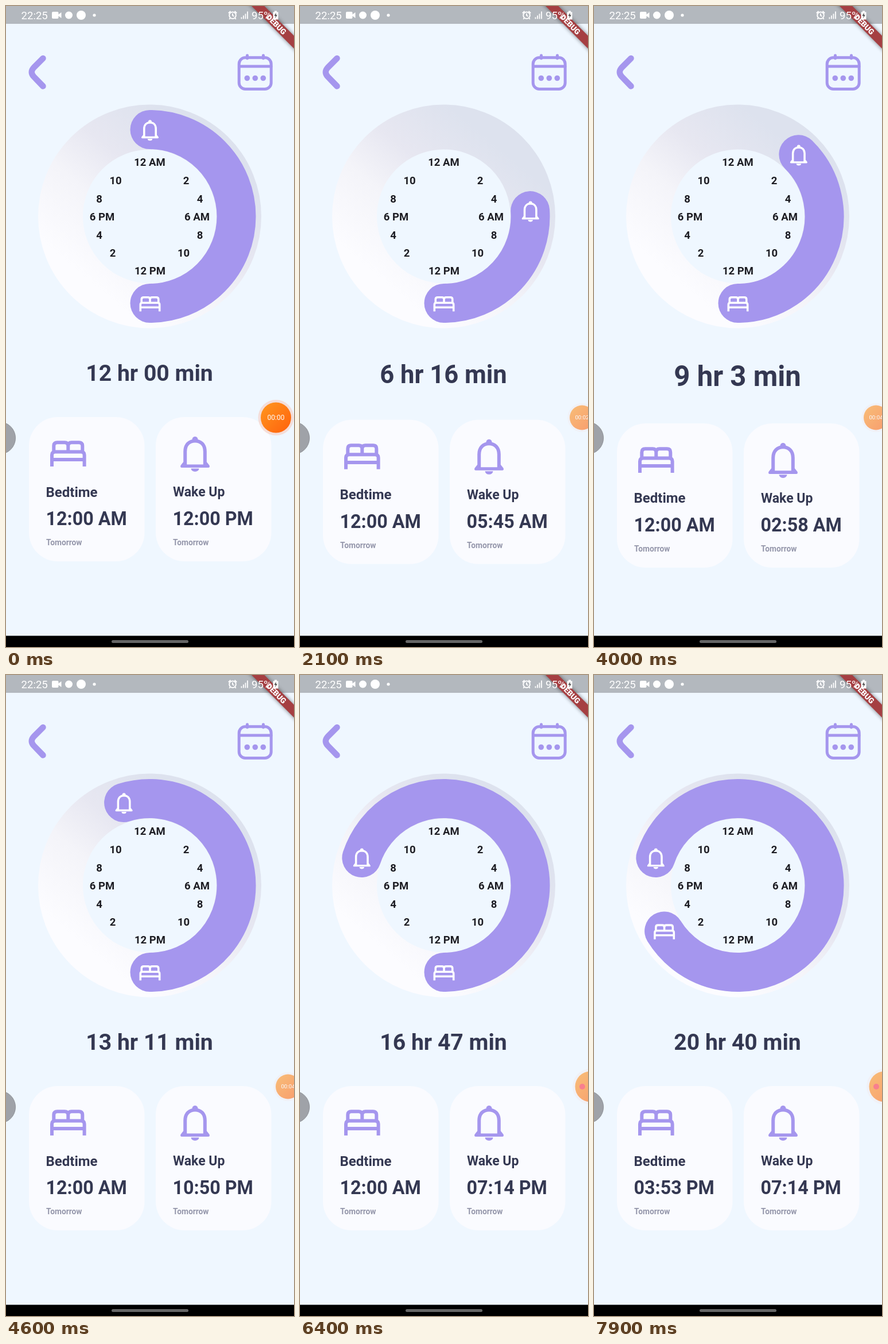
Recreate the animation shown at these times as an HTML page. Size 502 by 1115 pixels, loop 8000 ms.

```html
<!DOCTYPE html>
<html lang="en">
<head>
<meta charset="utf-8">
<title>Sleep timer</title>
<style>
  html, body { margin: 0; width: 100%; height: 100%; overflow: hidden; background: #eff7ff; }
  svg { display: block; width: 502px; height: 1115px; font-family: Roboto, sans-serif; }
  .dial { font-size: 18.5px; font-weight: 700; fill: #1c1c22; text-anchor: middle; }
  .ink { font-weight: 700; fill: #343852; }
  .title { font-size: 24px; }
  .time { font-size: 32.3px; }
  .day { font-size: 13.8px; font-weight: 700; fill: #9597ab; }
  .status { font-size: 18.6px; fill: #fff; }
</style>
</head>
<body>
<svg viewBox="0 0 502 1115">
  <defs>
    <linearGradient id="track" x1=".82" y1=".12" x2=".18" y2=".88">
      <stop offset="0" stop-color="#dde2ee"/>
      <stop offset=".35" stop-color="#e7e7f1"/>
      <stop offset=".62" stop-color="#f4f4f9"/>
      <stop offset="1" stop-color="#fcfcff"/>
    </linearGradient>
    <linearGradient id="orange" x1="0" y1="0" x2="1" y2="1">
      <stop offset="0" stop-color="#ff981f"/>
      <stop offset="1" stop-color="#ff600d"/>
    </linearGradient>
    <filter id="blur" x="-20%" y="-100%" width="140%" height="300%"><feGaussianBlur stdDeviation="3.5"/></filter>
    <g id="bell">
      <circle cy="-25" r="5" fill="currentColor"/>
      <path d="M-17.3 20V-4C-17.3 -16 -10 -22.6 0 -22.6S17.3 -16 17.3 -4V20" fill="none" stroke="currentColor" stroke-width="6"/>
      <path d="M-20.2 14L-25 20Q-26.5 24 -23 24H23Q26.5 24 25 20L20.2 14L14.4 18.4H-14.4Z" fill="currentColor"/>
      <path d="M-7 25.4A7 5.6 0 0 0 7 25.4Z" fill="currentColor"/>
    </g>
    <g id="bed" fill="none" stroke="currentColor" stroke-width="6">
      <path d="M-25 -2V-13Q-25 -19.2 -19 -19.2H-6Q0 -19.2 0 -13V-4V-13Q0 -19.2 6 -19.2H19Q25 -19.2 25 -13V-2"/>
      <path d="M-28.3 22.5V2.5Q-28.3 -3 -22.5 -3H22.5Q28.3 -3 28.3 2.5V22.5M-28 10.6H28"/>
    </g>
  </defs>

  <rect width="502" height="1115" fill="#eff7ff"/>

  <g fill="none" stroke="#a596ee" stroke-linecap="round" stroke-linejoin="round">
    <path d="M64.5 91L48.5 107Q41 115 48.5 123L64.5 139.5" stroke-width="10.5"/>
    <rect x="406.2" y="89.7" width="56" height="54.8" rx="11" stroke-width="5"/>
    <path d="M407 105H462M420.5 86V91M448.5 86V91" stroke-width="5"/>
  </g>
  <g fill="#a596ee">
    <circle cx="420.3" cy="125.5" r="4.8"/><circle cx="434.3" cy="125.5" r="4.8"/><circle cx="448.3" cy="125.5" r="4.8"/>
  </g>

  <circle cx="250.5" cy="366" r="155.5" fill="none" stroke="url(#track)" stroke-width="78"/>
  <path id="arc" fill="none" stroke="#a596ee" stroke-width="68" stroke-linecap="round"/>
  <use id="bellKnob" href="#bell" color="#fff"/>
  <use id="bedKnob" href="#bed" color="#fff"/>
  <g id="dial" class="dial"></g>

  <text id="total" class="ink" x="250" text-anchor="middle"></text>

  <g id="cards">
    <rect x="40" y="715" width="201.5" height="251" rx="50" fill="#fafbff"/>
    <rect x="261" y="715" width="201.5" height="251" rx="50" fill="#fafbff"/>
    <use href="#bed" x="108.3" y="778.5" color="#a596ee"/>
    <use href="#bell" x="329.5" y="779" color="#a596ee"/>
    <text class="ink title" x="69.5" y="853.5">Bedtime</text>
    <text class="ink title" x="291" y="853" style="font-size:23px">Wake Up</text>
    <text id="bedTime" class="ink time" x="69.5" y="903.4"></text>
    <text id="wakeTime" class="ink time" x="290.5" y="903"></text>
    <text class="day" x="70" y="938">Tomorrow</text>
    <text class="day" x="291" y="938">Tomorrow</text>
  </g>

  <circle cx="-11.5" cy="751.5" r="28" fill="#9fa2a8" stroke="#8f9298"/>

  <g id="badge">
    <circle id="halo" r="31" fill="#f6d8d0"/>
    <circle r="26.5" fill="url(#orange)"/>
    <text id="clock" text-anchor="middle" y="4.3" font-size="12" fill="#fff"></text>
    <circle id="dot" cx="-14" r="5" fill="#ff3044"/>
  </g>

  <rect width="502" height="31" fill="#b3b8be"/>
  <g transform="translate(502 0) rotate(45)">
    <rect x="-80" y="36.6" width="160" height="15.7" filter="url(#blur)" opacity=".5"/>
    <rect x="-80" y="36.6" width="160" height="15.7" fill="#a53f42"/>
    <text x="1" y="49.2" text-anchor="middle" font-size="13.4" font-weight="900" fill="#fff">DEBUG</text>
  </g>
  <g fill="#fff">
    <text class="status" x="26.5" y="22.6">22:25</text>
    <rect x="80" y="10" width="11.5" height="12" rx="2"/><path d="M91 15L96.5 11V21L91 17Z"/>
    <circle cx="109.5" cy="16" r="6.5"/><circle cx="131" cy="16" r="8"/><circle cx="154" cy="16" r="2.6"/>
    <path d="M409.5 22.5v-3h2v3zM413 22.5v-6h2v6zM416.5 22.5v-9h2v9zM420 22.5v-13h2v13z" opacity=".9"/>
    <text class="status" x="428" y="22.6">95%</text>
    <path d="M465.5 10.5h2.5v-2h4v2h2.5v13h-9z"/>
  </g>
  <path d="M471 11.5L467.5 17H470L469 21.5L472.8 15.5H470.3Z" fill="#444"/>
  <g fill="none" stroke="#fff" stroke-width="1.9">
    <circle cx="395" cy="16.3" r="5.8"/>
    <path d="M395 13V16.5L397.5 18M387.8 12.5L391.5 9M402.2 12.5L398.5 9M390.7 21L389.3 23M399.3 21L400.7 23"/>
  </g>

  <rect y="1095.5" width="502" height="19.5"/>
  <rect x="184" y="1103" width="134" height="5" rx="2.5" fill="#656565"/>
</svg>

<script>
const LOOP = 8000, STEP = 100;
const CX = 250.5, CY = 366, R = 151, ICON = 0.59;

// [ms, minutes on the 24 h dial]
const wakeKeys = [
  [500, 0], [600, 13], [700, 13], [800, 30], [1300, 180], [1600, 250], [2100, 345],
  [2400, 372], [2800, 372], [3200, 366], [3400, 366], [3500, 358], [3600, 355],
  [4300, 46], [4600, -70], [5200, -192], [5300, -192], [5600, -280], [5800, -280], [5900, -286]
];
const bedKeys = [[6800, 720], [6900, 745], [7500, 939], [7800, 939], [7900, 953]];

// The badge shrinks and fades, then docks at the edge.
const badgeX = [[800, 470.5], [1200, 491.5], [4800, 491.5], [5100, 506]];
const badgeScale = [[800, 1], [1200, 0.81], [4800, 0.81], [5100, 1]];
const badgeAlpha = [[800, 1], [1200, 0.6]];
const haloAlpha = [[800, 0.8], [1200, 0.3]];
const ticks = [800, 1700, 2600, 3700];

const $ = id => document.getElementById(id);
const pad = n => String(n).padStart(2, "0");

function at(keys, t) {
  if (t <= keys[0][0]) return keys[0][1];
  for (let i = 1; i < keys.length; i++) {
    const [t0, a] = keys[i - 1], [t1, b] = keys[i];
    if (t <= t1) return a + (b - a) * (t - t0) / (t1 - t0);
  }
  return keys[keys.length - 1][1];
}

function point(min) {
  const a = min / 720 * Math.PI;
  return [CX + R * Math.sin(a), CY - R * Math.cos(a)];
}

function clockText(min) {
  const m = (min + 1440) % 1440, h = Math.floor(m / 60);
  return `${pad(h % 12 || 12)}:${pad(m % 60)} ${h < 12 ? "AM" : "PM"}`;
}

function fitSize(text) {
  const el = $("total");
  el.textContent = text;
  el.setAttribute("font-size", 100);
  return 100 * 221.5 / el.getComputedTextLength();
}

// Scales the total to a fixed box, then moves the cards below it.
function setTotal(text) {
  const el = $("total");
  if (el.textContent === text) return;
  const size = fitSize(text);
  el.setAttribute("font-size", size);
  el.setAttribute("y", 615.5 + 0.925 * size);
  $("cards").setAttribute("transform", `translate(0 ${1.1 * (size - baseSize)})`);
}

function place(id, [x, y]) {
  $(id).setAttribute("transform", `translate(${x + 0.5} ${y + 1}) scale(${ICON})`);
}

function draw(t) {
  const wake = Math.round(at(wakeKeys, t)), bed = Math.round(at(bedKeys, t));
  const moved = t >= 600, total = bed - wake + 1;
  const from = point(wake), to = point(bed);

  $("arc").setAttribute("d", `M${from}A${R} ${R} 0 ${bed - wake > 720 ? 1 : 0} 1 ${to}`);
  place("bellKnob", from);
  place("bedKnob", to);

  setTotal(moved ? `${Math.floor(total / 60)} hr ${total % 60} min` : "12 hr 00 min");
  $("wakeTime").textContent = moved ? clockText(wake) : "12:00 PM";
  $("bedTime").textContent = bed === 720 ? "12:00 AM" : clockText(bed);

  const docked = t >= 4900;
  $("badge").setAttribute("transform", `translate(${at(badgeX, t)} 716) scale(${at(badgeScale, t)})`);
  $("badge").setAttribute("opacity", at(badgeAlpha, t));
  $("halo").setAttribute("opacity", at(haloAlpha, t));
  $("clock").textContent = docked ? "" : "00:" + pad(ticks.filter(s => t >= s).length);
  $("dot").setAttribute("visibility", docked ? "visible" : "hidden");
}

[
  ["12 AM", 250.5, 271.5], ["10", 191, 303], ["2", 314, 303], ["8", 162.5, 335], ["4", 338, 335],
  ["6 PM", 167.5, 366.5], ["6 AM", 333, 366.5], ["4", 162.5, 398], ["8", 338, 398],
  ["2", 186, 429.5], ["10", 309.5, 429.5], ["12 PM", 251, 460.5]
].forEach(([label, x, y]) => {
  const el = document.createElementNS("http://www.w3.org/2000/svg", "text");
  el.textContent = label;
  el.setAttribute("x", x);
  el.setAttribute("y", y + 6.6);
  $("dial").append(el);
});

const baseSize = fitSize("00 hr 00 min");
const start = performance.now();
function frame() {
  const t = (performance.now() - start) % LOOP;
  draw(Math.floor(t / STEP) * STEP);
  requestAnimationFrame(frame);
}
frame();
</script>
</body>
</html>
```
